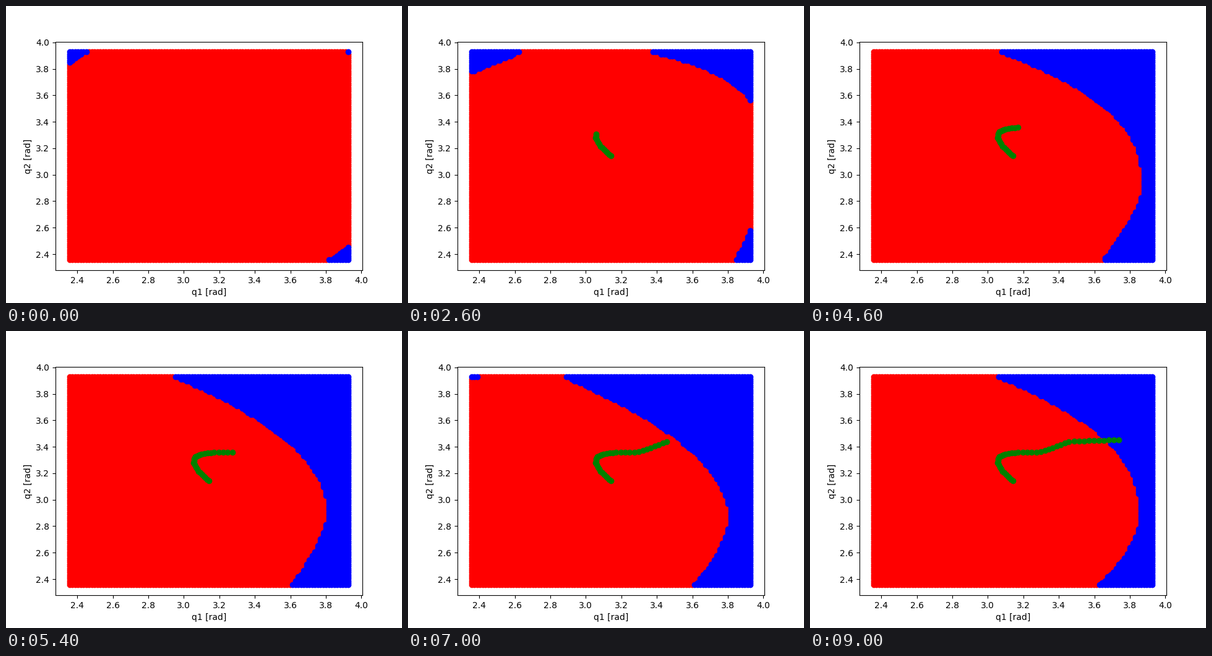
Recreate the animation shown at these times as a matplotlib script. Size 640 by 480 pixels, loop 9.2 s.

```python
import numpy as np
import matplotlib.pyplot as plt
from matplotlib.animation import FuncAnimation

FRAMES, INTERVAL = 46, 200
LOW, HIGH, N = 3 * np.pi / 4, 5 * np.pi / 4, 101
PAD = 0.05 * (HIGH - LOW)

# Stage pixels of the grid corners (y grows downwards)
LEFT, RIGHT, TOP, BOTTOM = 102.55, 553.45, 74.4, 410.4

q = np.linspace(LOW, HIGH, N)
Q1, Q2 = np.meshgrid(q, q)
X, Y = np.meshgrid(np.linspace(LEFT, RIGHT, N), np.linspace(BOTTOM, TOP, N))

# Right border: time, top x, tip x, tip y, bottom x, upper power, lower power
BORDER = [
    (0, 553, 575, 376, 522, 10, 1),
    (7, 450, 590, 300, 575, 7.3, 1.5),
    (19, 342, 556, 295, 486, 3.1, 1.4),
    (27, 274, 521, 297, 463, 2.15, 1.45),
    (31, 220, 536, 320, 486, 1.6, 1.4),
    (39, 287, 504, 285, 441, 2.4, 1.9),
    (45, 305, 534, 299, 468, 2.4, 1.8),
]

# Upper-left border: time, y at the left side, slope
CORNER = [
    (0, 91, -0.61), (7, 142, -0.535), (18, 77, -0.3), (19, 70, -0.1),
    (27, 70, -0.1), (31, 95, -0.08), (36, 70, -0.1),
]

# Green path: time, x, y
PATH = [
    (1, 328, 242.4), (7, 311.4, 226.6), (11, 303.4, 213), (13, 303.7, 207.4),
    (15, 306.2, 203), (19, 315.7, 198.7), (23, 336.2, 195.8),
    (27, 365.7, 195.8), (29, 380, 193.3), (31, 392.2, 188.7),
    (35, 418.2, 178.8), (37, 435, 177.9), (45, 499.3, 175.8),
]


def tween(t, keys):
    """Interpolate every column of the keys at time t."""
    times, *values = zip(*keys)
    return [np.interp(t, times, column) for column in values]


def blue_mask(t):
    top_x, tip_x, tip_y, bottom_x, p_up, p_down = tween(t, BORDER)
    up = np.clip((tip_y - Y) / (tip_y - TOP), 0, 1)
    down = np.clip((Y - tip_y) / (BOTTOM - tip_y), 0, 1)
    edge = tip_x - (tip_x - top_x) * up**p_up - (tip_x - bottom_x) * down**p_down
    corner_y, slope = tween(t, CORNER)
    corner = corner_y + slope * (X - LEFT)
    return (X >= edge - 0.5) | (Y <= corner + 0.5)


path_x, path_y = tween(np.arange(1, FRAMES), PATH)
path_q1 = LOW + (path_x - LEFT) / (RIGHT - LEFT) * (HIGH - LOW)
path_q2 = HIGH - (path_y - TOP) / (BOTTOM - TOP) * (HIGH - LOW)

fig, ax = plt.subplots(figsize=(6.4, 4.8), dpi=100)
ax.set_xlim(LOW - PAD, HIGH + PAD)
ax.set_ylim(LOW - PAD, HIGH + PAD)
ax.set_xlabel("q1 [rad]")
ax.set_ylabel("q2 [rad]")
red, = ax.plot([], [], "ro")
blue, = ax.plot([], [], "bo")
green, = ax.plot([], [], "go")


def update(i):
    mask = blue_mask(i)
    red.set_data(Q1[~mask], Q2[~mask])
    blue.set_data(Q1[mask], Q2[mask])
    green.set_data(path_q1[:i], path_q2[:i])
    return red, blue, green


anim = FuncAnimation(fig, update, frames=FRAMES, interval=INTERVAL,
                     repeat=True, repeat_delay=0)
plt.show()
```
